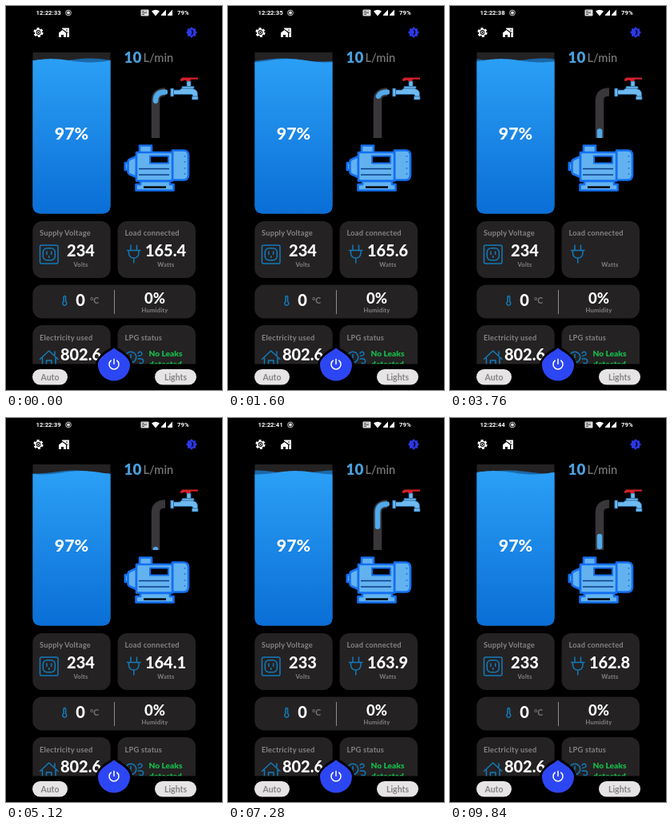
Write an HTML page that moves like this. It is 270x480 px and loops after 9920 ms.

```html
<!DOCTYPE html>
<html lang="en">
<head>
<meta charset="utf-8">
<title>Home dashboard</title>
<style>
html, body { margin: 0; width: 100%; height: 100%; overflow: hidden; background: #000; }
svg { display: block; width: 100vw; height: 100vh; }
text { font-family: Lato, sans-serif; font-weight: 700; fill: #fff; }
.bar { font: 700 7.8px Roboto, sans-serif; }
.brand { font-size: 12px; font-variant: small-caps; letter-spacing: 2px; fill: #2c38e6; }
.label { font-size: 9.3px; letter-spacing: .2px; fill: #858384; }
.unit { font-size: 7.6px; letter-spacing: .2px; fill: #858384; text-anchor: middle; }
.value { font-size: 20px; font-weight: 800; text-anchor: middle; }
.pill { font-size: 10.5px; fill: #858384; text-anchor: middle; }
.leak { font-size: 10.2px; font-weight: 900; fill: #18b84a; text-anchor: middle; }
.card { fill: #242223; }
.icon { fill: none; stroke: #147ab9; stroke-width: 1.5; stroke-linecap: round; stroke-linejoin: round; }
.motor { fill: #62b2f0; stroke: #146ff0; stroke-width: 2.6; stroke-linejoin: round; }
.tap { fill: #6ebaf0; stroke: #235f96; stroke-width: .8; stroke-linejoin: round; }
</style>
</head>
<body>
<svg viewBox="0 0 270 480">
  <defs>
    <linearGradient id="blue" x1="0" y1="0" x2="0" y2="1">
      <stop offset="0" stop-color="#2b9ff5"/>
      <stop offset="1" stop-color="#0a6ed6"/>
    </linearGradient>
    <clipPath id="tank"><path d="M33.5 58H130.5V249Q130.5 259.5 120 259.5H44Q33.5 259.5 33.5 249Z"/></clipPath>
    <clipPath id="pipe"><path d="M180 95H202V165H180Z"/></clipPath>
  </defs>
  <rect width="270" height="480"/>

  <!-- status bar -->
  <text id="clock" class="bar" x="37.5" y="11.3"></text>
  <circle cx="78" cy="8.5" r="3.4" fill="none" stroke="#ccc" stroke-width="1"/>
  <circle cx="78" cy="8.5" r="2" fill="#ddd"/>
  <rect x="168.5" y="4.5" width="10" height="8" rx="1" fill="#ddd"/>
  <path d="M170 6.5H173M170 8.5H176M170 10.5H173M175 6V7" stroke="#222" stroke-width=".8"/>
  <path d="M182 6.5Q187 3 192 6.5L187 12.5ZM194 12V11L200 4.5V12ZM202 12V11L208 4.5V12Z" fill="#fff"/>
  <text class="bar" x="214" y="11.3">79%</text>

  <!-- header -->
  <g fill="none" stroke="#fff">
    <circle cx="40.5" cy="33" r="5" stroke-width="2.2" stroke-dasharray="3 2.236"/>
    <circle cx="40.5" cy="33" r="3.7" stroke-width="1.6"/>
    <circle cx="40.5" cy="33" r="1.5" stroke-width="1"/>
  </g>
  <path d="M66 39V33.5L70.5 30L75 33.5V39H72V36H69V39ZM70 27.5H79V39H76.3V32.8L70 28.5Z" fill="#fff"/>
  <path d="M75 30H77M76.5 33H78" stroke="#000" stroke-width=".9"/>
  <path d="M232 26L234 28.2H237V31L239 33L237 35V37.8H234L232 40L230 37.8H227V35L225 33L227 31V28.2H230Z" fill="#2c38e6"/>
  <path d="M231.3 29.3A3.8 3.8 0 0 1 231.3 36.7Q234 33 231.3 29.3Z" fill="#000"/>

  <!-- water tank -->
  <g clip-path="url(#tank)">
    <rect class="card" x="33" y="58" width="98" height="202"/>
    <path id="back" fill="#1b68a8"/>
    <path id="front" fill="url(#blue)"/>
  </g>
  <text class="value" x="82" y="167" style="font-size:21.3px">97%</text>

  <!-- flow -->
  <text x="147.5" y="71" style="font-size:18.8px;font-weight:900;fill:#4a9fdc">10</text>
  <text x="171.5" y="70" style="font-size:14.6px;font-weight:600;fill:#777576">L/min</text>
  <path d="M187 165V118Q187 107.5 199 107.5" fill="none" stroke="#39373a" stroke-width="10.5"/>
  <g clip-path="url(#pipe)">
    <path id="flow" d="M187 165V118Q187 107.5 199 107.5" pathLength="67" fill="none" stroke="#52a9ea" stroke-width="6.6" stroke-linecap="round"/>
  </g>
  <path class="tap" d="M226 94H231V101H234V103.5Q239.5 105 239.5 110V113.5H233.5V112Q233.5 110.5 231 110.5H209V105H217L221 102V101H226Z"/>
  <path class="tap" d="M205.8 103H209.5V113H205.8ZM232.5 113H240V117H232.5ZM220 100.5H235V103H220Z"/>
  <path d="M217.5 92.5L220 89.5H240V91.8H231L230 94H226L224 92.5L219 94Z" fill="#d4212c"/>

  <!-- motor -->
  <g class="motor">
    <rect x="148.8" y="196" width="4.5" height="9"/>
    <path d="M163 188L155 191.5Q152.5 192.5 152.5 195V207Q152.5 209.5 155 210.5L163 214Z"/>
    <path d="M168 219H205V223H209.5V230.5H162.5V223H168Z"/>
    <rect x="167" y="174.5" width="15" height="9"/>
    <path d="M208 180.5H222Q228 180.5 228 187V211Q228 217.5 222 217.5H208Z"/>
    <path d="M163 183H208V218.5H163Z"/>
    <path d="M180 187.5H203V196.5H180Z" fill="#000" stroke-width="2"/>
    <path d="M166 203.5H204M166 211H204" stroke="#0d3f86" stroke-width="1.6"/>
    <path d="M172 226.5H200" stroke="#000" stroke-width="2.4"/>
  </g>
  <path d="M223.5 187V188.5M223.5 194V195.5M223.5 202V203.5M223.5 209V210.5" stroke="#146ff0" stroke-width="1.8"/>

  <!-- cards -->
  <g class="card">
    <rect x="33.3" y="269" width="97.4" height="71" rx="12"/>
    <rect x="139.5" y="269" width="97.5" height="71" rx="12"/>
    <rect x="33.3" y="348.5" width="203.7" height="42" rx="12"/>
    <rect x="33.3" y="399" width="97.4" height="71" rx="12"/>
    <rect x="139.5" y="399" width="97.5" height="71" rx="12"/>
  </g>
  <text class="label" x="42" y="287">Supply Voltage</text>
  <text class="label" x="148.5" y="287">Load connected</text>
  <text class="label" x="42" y="418">Electricity used</text>
  <text class="label" x="148.5" y="418">LPG status</text>
  <text id="volts" class="value" x="93.5" y="313"></text>
  <text id="watts" class="value" x="199.5" y="313"></text>
  <text class="unit" x="93.5" y="326">Volts</text>
  <text class="unit" x="200" y="326">Watts</text>
  <text class="value" x="93" y="375">0</text>
  <text x="105" y="371.5" style="font-size:10.5px;fill:#777576">°C</text>
  <text class="value" x="186" y="371.5" style="font-size:18.5px">0%</text>
  <text class="unit" x="186" y="383">Humidity</text>
  <path d="M135.5 355V385" stroke="#8c8a8b" stroke-width="1"/>
  <text class="value" x="93.5" y="443">802.6</text>
  <text class="leak" x="199.5" y="438">No Leaks</text>
  <text class="leak" x="199.5" y="451">detected</text>

  <g class="icon">
    <rect x="42.5" y="299" width="22.5" height="23" rx="2"/>
    <rect x="46.3" y="302.8" width="15" height="15" rx="5"/>
    <path d="M51 307V310.5M56.7 307V310.5M53.8 312.5V314.5"/>
    <path d="M156 299V305M163.5 299V305M151.5 305.5H168M153.5 306V309Q154 315 159.8 315Q165.5 315 166 309V306M159.8 315V321"/>
    <path d="M42.5 441.5L53.7 431L65 441.5M45.5 440V452M62 440V452M61 436V432M50.5 452V443H57V452"/>
    <circle cx="156" cy="439" r="6.8"/>
    <path d="M156 435.5V439.5M156 442V442.2M165 434Q167 431 169.5 433Q171.5 437 165.5 437.5M165 441H169Q173 442 171 446Q169 448 167 446"/>
    <path d="M72 369.5V363.5Q73.3 361.5 74.6 363.5V369.5A2.5 2.5 0 1 1 72 369.5Z"/>
  </g>

  <!-- bottom bar -->
  <rect y="447.5" width="270" height="33"/>
  <rect x="33" y="454" width="44" height="19.5" rx="9.7" fill="#e6e4e5"/>
  <rect x="186" y="454" width="52" height="19.5" rx="9.7" fill="#e6e4e5"/>
  <text class="pill" x="55" y="467.5">Auto</text>
  <text class="pill" x="212" y="467.5">Lights</text>
  <path d="M135 427.5C140 432 155 438 155 448.5A20 20 0 0 1 115 448.5C115 438 130 432 135 427.5Z" fill="#2d46f4" stroke="#000" stroke-width="6" paint-order="stroke"/>
  <path d="M131.3 443.2A6 6 0 1 0 138.7 443.2M135 441.5V447.5" fill="none" stroke="#fff" stroke-width="1.5" stroke-linecap="round"/>
</svg>
<script>
const LOOP = 9920, FLOW = 1500;
const $ = id => document.getElementById(id);
const clock = $('clock'), volts = $('volts'), watts = $('watts'), flow = $('flow');

const ticks = [700, 1500, 2300, 3000, 3600, 4600, 5600, 6600, 7600, 8600, 9600];
const load = [[0, '165.4'], [1000, '165.6'], [3720, ''], [3840, '164.1'], [6240, '163.9'], [7800, '163.0'], [9360, '162.8']];

const ease = p => p >= 1 ? 1 : p < .5 ? 2 * p * p : 1 - 2 * (1 - p) ** 2;
const setText = (el, s) => { if (el.textContent !== s) el.textContent = s; };

// A sine surface whose trough sits at x = trough and drifts left
function drawWave(el, t, trough, period, level, height) {
  let d = 'M33 260';
  for (let x = 33; x <= 131; x += 2) {
    const y = level + height * Math.cos(2 * Math.PI * ((x - trough) / 97 + t / period));
    d += `L${x} ${y.toFixed(2)}`;
  }
  el.setAttribute('d', d + 'V260Z');
}

function drawFlow(t) {
  const p = (t + 930) % FLOW;
  const head = 67 * ease(p / 750), tail = 67 * ease(p / FLOW);
  flow.setAttribute('stroke-dasharray', `${Math.max(head - tail, .01)} 200`);
  flow.setAttribute('stroke-dashoffset', -tail);
  flow.style.opacity = p < 20 || tail > 66 ? 0 : 1;
}

function frame() {
  const t = performance.now() % LOOP;
  setText(clock, '12:22:' + (33 + ticks.filter(s => s <= t).length));
  setText(volts, t < 6240 ? '234' : '233');
  setText(watts, load.filter(([s]) => s <= t).pop()[1]);
  drawWave($('back'), t, 56, 4250, 67.5, 2);
  drawWave($('front'), t, 105, 1960, 68.3, 2.2);
  drawFlow(t);
  requestAnimationFrame(frame);
}
frame();
</script>
</body>
</html>
```
